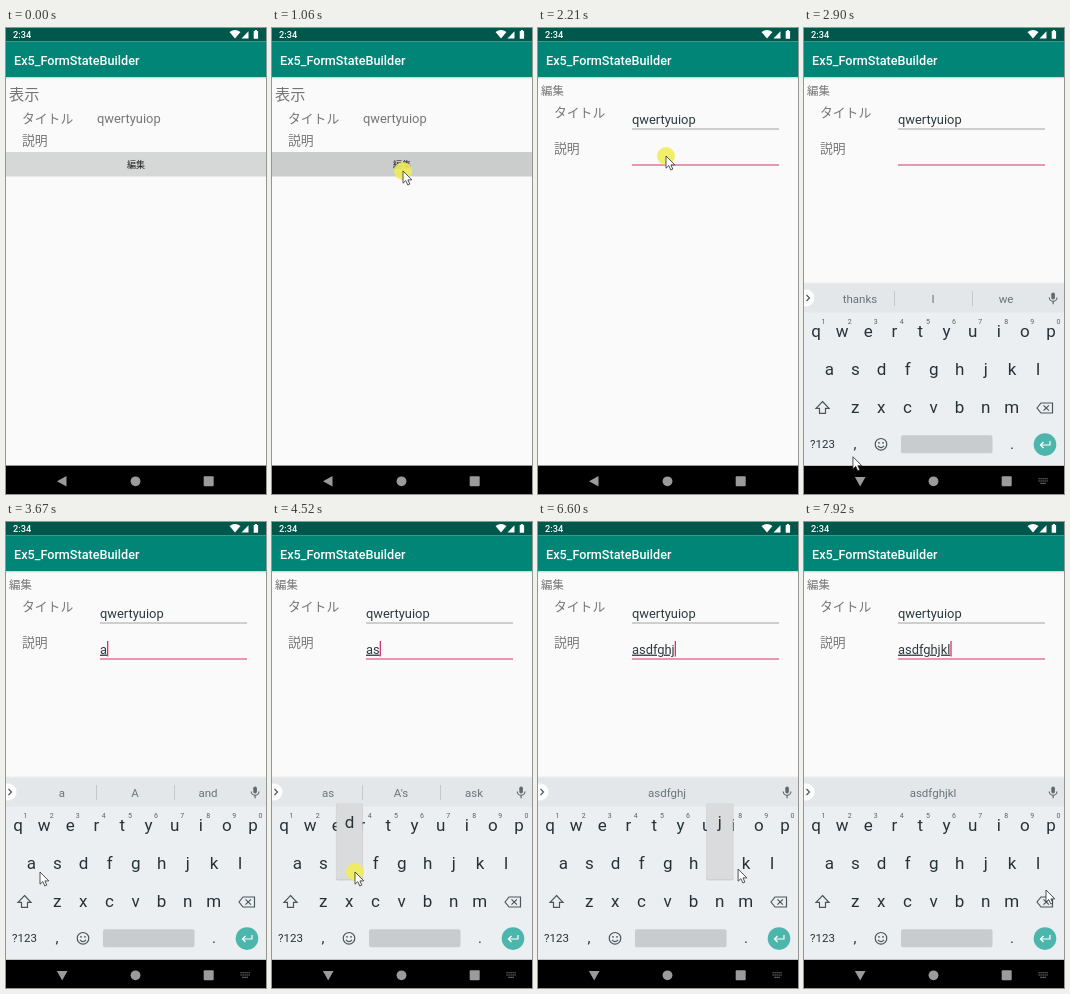
Animation of 260x466 px, one loop 8 s. Source, as an HTML page:

```html
<!DOCTYPE html>
<html lang="ja">
<head>
<meta charset="utf-8">
<title>Form demo</title>
<style>
  html, body { margin: 0; width: 100%; height: 100%; overflow: hidden; background: #000; }
  svg { display: block; }
  #stage { width: 100vw; height: 100vh; }
  text { font-family: Roboto, "Noto Sans CJK JP", "Noto Sans CJK", sans-serif; white-space: pre; }
  .medium { font-weight: 500; }
  #typed { text-decoration: underline; text-decoration-thickness: .8px; }
</style>
</head>
<body>
<svg id="stage" viewBox="0 0 260 466"></svg>
<script>
const LOOP = 8000;
const OPEN_AT = 1380, OPEN_MS = 425;
const FOCUS_AT = 2210, KEYBOARD_AT = 2440;
const STAGE_H = 466, BODY_H = 437.6;
const GRAY = '#757575', INK = '#263238', FIELD_INK = '#2c3a3d', PINK = '#d8346e', RULE = '#a3a3a3';

// Markup helpers
const text = (x, y, size, str, fill = GRAY, attrs = '') =>
  `<text x="${x}" y="${y}" font-size="${size}" fill="${fill}" ${attrs}>${str}</text>`;
const centered = (x, y, size, str, fill, attrs = '') =>
  text(x, y, size, str, fill, `text-anchor="middle" ${attrs}`);
const rect = (x, y, w, h, fill, attrs = '') =>
  `<rect x="${x}" y="${y}" width="${w}" height="${h}" fill="${fill}" ${attrs}/>`;
const line = (y, id = '') =>
  `<line id="${id}" x1="94" x2="241" y1="${y}" y2="${y}" stroke="${RULE}"/>`;

const appFrame = () =>
  rect(0, 0, 260, BODY_H, '#fafafa') + rect(0, 0, 260, 13.5, '#00574b') +
  rect(0, 13.5, 260, 35.5, '#008577') +
  rect(0, 49, 260, 1, '#000', 'opacity=".14"') + rect(0, 50, 260, 1, '#000', 'opacity=".05"') +
  text(8, 36.8, 12.65, 'Ex5_FormStateBuilder', '#fff', 'class="medium"');

const viewScreen = appFrame() +
  text(3, 71.5, 15.2, '表示') +
  text(16, 94.6, 12.8, 'タイトル') + text(91, 94.5, 12.9, 'qwertyuiop') +
  text(16, 117, 12.8, '説明') +
  rect(0, 124, 260, 24.5, '#d6d7d7') +
  rect(0, 124, 260, 24.5, '#000', 'id="ripple" opacity="0"') +
  centered(130, 139.6, 9, '編集', '#222', 'class="medium"') +
  rect(0, 0, 260, BODY_H, '#000', 'id="dim" opacity="0"');

const editScreen = appFrame() +
  text(3, 66.7, 11.4, '編集') +
  text(16, 88.6, 12.8, 'タイトル') + text(94, 95.6, 12.9, 'qwertyuiop', FIELD_INK) + line(101) +
  text(16, 124.8, 12.8, '説明') +
  text(94, 131.6, 12.9, '', FIELD_INK, 'id="typed"') +
  rect(94, 119, 1.3, 15.5, PINK, 'id="caret"') + line(137, 'focusLine');

// Keyboard
const keyX = {};
const keyRow = (letters, x0, baseline) => [...letters].map((c, i) => {
  keyX[c] = x0 + i * 26.1;
  return centered(keyX[c], baseline, 17, c, INK);
}).join('');
const digits = [...'1234567890'].map((d, i) =>
  centered(19.5 + i * 26.1, 296, 7, d, '#566166')).join('');
const stroke = (d, color = '#4b565b') =>
  `<path d="${d}" fill="none" stroke="${color}" stroke-width="1.2"/>`;

const keyboard =
  rect(0, 254.5, 260, 1.5, '#000', 'opacity=".06"') +
  rect(0, 256, 260, 182, '#eceff1') + rect(0, 256, 260, 28.5, '#e3e7ea') +
  '<circle cx="2" cy="270" r="8.5" fill="#fff"/>' + stroke('M2.5 267l3 3l-3 3') +
  '<g id="suggestions"></g>' +
  rect(247.3, 264.5, 3.6, 7, '#5f6a6f', 'rx="1.8"') +
  stroke('M245.3 269.5a3.8 3.8 0 0 0 7.6 0M249.1 273.3v3', '#5f6a6f') +
  keyRow('qwertyuiop', 12, 308.5) + digits +
  keyRow('asdfghjkl', 25.3, 347) + keyRow('zxcvbnm', 51.2, 385) +
  stroke('M18.5 373.5l6.5 6.8h-3.5v5h-6v-5h-3.5z') +
  stroke('M233 380l4-5h11.5v10H237zM239.5 377.3l5.4 5.4m0-5.4l-5.4 5.4') +
  centered(18.5, 420.3, 11.5, '?123', INK) + centered(51, 420.5, 15, ',', INK) +
  '<circle cx="77" cy="416.3" r="5.8" fill="none" stroke="#4b565b" stroke-width="1.2"/>' +
  '<circle cx="75" cy="414.8" r=".9" fill="#4b565b"/><circle cx="79" cy="414.8" r=".9" fill="#4b565b"/>' +
  stroke('M74 417.8q3 3.6 6 0') +
  rect(97, 407.3, 91.5, 18, '#c8cccf', 'rx="2"') + centered(208, 420.5, 15, '.', INK) +
  '<circle cx="241" cy="416.6" r="11.3" fill="#4db6ac"/>' +
  stroke('M246 413v4h-9.5m3-3l-3 3l3 3', '#fff') +
  `<g id="popup">${rect(-13.6, 281.5, 27.2, 77, '#000', 'rx="2" opacity=".13"')}
   ${rect(-13, 281, 26, 76, '#d9dbdc', 'rx="2"')}
   ${centered(0, 306, 17, '', INK, 'id="popupKey"')}</g>`;

const statusIcons = text(7, 10, 9.2, '2:34', '#fff', 'class="medium"') +
  `<path fill="#fff" d="M229 10.5L223.5 4Q229 0 234.5 4zM235.5 10.5L242.5 3.2V10.5z"/>` +
  rect(247.7, 3, 4.4, 7.8, '#fff', 'rx=".6"') + rect(248.9, 2, 2, 1.5, '#fff');

const NAV = '#9b9b9b';
const navIcons = `<path id="back" d="M51 453.3L60.5 448V458.6z" fill="${NAV}"/>
  <circle cx="129.5" cy="453.3" r="4.9" fill="${NAV}"/>` +
  rect(197.7, 448.3, 10, 10, NAV, 'rx="1"') +
  `<path id="imeIcon" d="M234.5 450.8h9.6M234.5 453h9.6M236.5 455.4h5.6" stroke="#8a8a8a"
   stroke-width="1.1" stroke-dasharray="1.2 .8"/>`;

document.getElementById('stage').innerHTML = `
  <clipPath id="revealClip"><rect id="reveal" width="260" height="${STAGE_H}"/></clipPath>
  <g id="view">${viewScreen}</g>
  <g id="edit"><g clip-path="url(#revealClip)">${editScreen}</g></g>
  <svg width="260" height="${BODY_H}"><g id="keyboard">${keyboard}</g></svg>
  ${statusIcons}${navIcons}
  <g id="pointer">
    <circle id="click" r="9" fill="#f0ec5c" opacity=".9"/>
    <path d="M0 0V12.2L2.8 9.6L4.8 14L6.8 13.1L4.9 8.9H8.8z" fill="#fff" stroke="#2a2a2a" stroke-width=".8"/>
  </g>`;

const el = {};
document.querySelectorAll('[id]').forEach(node => el[node.id] = node);
const set = (id, name, value) => el[id].setAttribute(name, value);
const show = (id, on) => set(id, 'visibility', on ? 'visible' : 'hidden');

// Timeline
const presses = [['a', 3430], ['s', 4050], ['d', 4520], ['f', 5070], ['g', 5600],
  ['h', 6060], ['j', 6440], ['k', 6910], ['l', 7600]];
const POPUP_MS = 235, COMMIT_MS = 80, CLICK_MS = 120;
const clicks = [980, 2130, 3290, ...presses.slice(1).map(p => p[1])];

const pointerPath = [ // time, x, y
  [210, 204, 468], [560, 168, 270], [900, 131, 143], [1600, 131, 143], [2050, 128, 128],
  [2400, 128, 128], [2900, 49, 429], [3210, 31, 353], [3440, 31, 350], [3670, 34, 350],
  [3890, 34, 350], [4050, 56, 350], [4130, 57, 350], [4290, 83, 350], [4650, 83, 350],
  [4820, 109, 349], [5130, 109, 349], [5220, 116, 347], [5450, 135, 348], [5690, 135, 348],
  [5840, 161, 348], [6190, 161, 348], [6400, 188, 348], [6500, 188, 348], [6600, 200, 347],
  [6760, 215, 347], [7140, 215, 347], [7370, 235, 346], [7540, 242, 345], [7770, 242, 345],
  [7920, 242, 368]];

const suggestionsFor = {
  '': ['thanks', 'I', 'we'], a: ['a', 'A', 'and'], as: ['as', "A's", 'ask'],
  asd: ['asd', 'ASD', 'and'], asdf: ['asdf', 'ASDF', 'and'],
  asdfg: ['asdfg', 'ASDFG', 'and'], asdfgh: ['asdfgh', 'ASDFGH', 'and']
};

const clamp = v => Math.min(1, Math.max(0, v));
const cubic = (a, b, c, d, s) =>
  a * (1 - s) ** 3 + 3 * b * s * (1 - s) ** 2 + 3 * c * s * s * (1 - s) + d * s ** 3;

// y at a given x on a Bezier curve, found by bisection
function curve(xs, ys, x) {
  let lo = 0, hi = 1;
  for (let i = 0; i < 24; i++) {
    const s = (lo + hi) / 2;
    if (cubic(...xs, s) < x) lo = s; else hi = s;
  }
  return cubic(...ys, lo);
}
const slideEase = p => curve([0, .4, .2, 1], [0, 0, 1, 1], p);
const revealEase = p => p < 1 / 6
  ? curve([0, .05, .1333, 1 / 6], [0, 0, .06, .4], p)
  : curve([1 / 6, .2083, .25, 1], [.4, .82, 1, 1], p);

function pointerAt(t) {
  const i = pointerPath.findIndex(p => p[0] > t);
  if (i === 0) return pointerPath[0].slice(1);
  if (i < 0) return pointerPath.at(-1).slice(1);
  const [t0, x0, y0] = pointerPath[i - 1], [t1, x1, y1] = pointerPath[i];
  const p = (t - t0) / (t1 - t0);
  return [x0 + (x1 - x0) * p, y0 + (y1 - y0) * p];
}

function drawScreens(t) {
  const p = clamp((t - OPEN_AT) / OPEN_MS), slide = slideEase(p);
  set('ripple', 'opacity', .1 * clamp((t - 980) / 160));
  set('view', 'transform', `translate(0 ${-8.9 * slide})`);
  set('dim', 'opacity', .1 * clamp(p * 4));
  show('view', p < 1);
  set('edit', 'transform', `translate(0 ${p < 1 ? 19.1 * (1 - slide) : 0})`);
  set('reveal', 'y', p < 1 ? .959 * STAGE_H * (1 - revealEase(p)) : 0);
  show('edit', p > 0);
}

let shownSuggestions;
function drawTyping(t) {
  const done = presses.filter(p => t >= p[1] + COMMIT_MS);
  const typed = done.map(p => p[0]).join('');
  el.typed.textContent = typed;

  const focused = t >= FOCUS_AT;
  set('focusLine', 'stroke', focused ? PINK : RULE);
  set('focusLine', 'stroke-width', focused ? 1.2 : 1);
  const lastEdit = done.length ? done.at(-1)[1] + COMMIT_MS : 2290;
  show('caret', t >= lastEdit && Math.floor((t - lastEdit) / 500) % 2 === 0);
  set('caret', 'x', 94 + (typed ? el.typed.getComputedTextLength() : 0));

  if (typed !== shownSuggestions) {
    shownSuggestions = typed;
    const words = suggestionsFor[typed];
    const word = (x, str) => centered(x, 274.8, 11.5, str, '#69757a');
    el.suggestions.innerHTML = words
      ? words.map((w, i) => word(56 + 73 * i, w)).join('') +
        rect(90, 263, 1, 15, '#c3c8cb') + rect(168, 263, 1, 15, '#c3c8cb')
      : word(129, typed);
  }

  const held = presses.find(p => t >= p[1] && t < p[1] + POPUP_MS);
  show('popup', !!held);
  if (held) {
    set('popup', 'transform', `translate(${keyX[held[0]]} 0)`);
    el.popupKey.textContent = held[0];
  }
}

function drawKeyboard(t) {
  const open = t >= KEYBOARD_AT;
  const p = clamp((t - KEYBOARD_AT + 60) / 260), ease = 1 - (1 - p) ** 2;
  set('keyboard', 'display', open ? 'inline' : 'none');
  set('keyboard', 'opacity', ease);
  set('keyboard', 'transform', `translate(0 ${20 * (1 - ease)})`);
  set('back', 'transform', open ? 'rotate(-90 56.2 453.3)' : '');
  show('imeIcon', open);
}

function draw() {
  const t = performance.now() % LOOP;
  drawScreens(t);
  drawTyping(t);
  drawKeyboard(t);
  set('pointer', 'transform', `translate(${pointerAt(t)})`);
  show('click', clicks.some(c => t >= c && t < c + CLICK_MS));
  requestAnimationFrame(draw);
}
draw();
</script>
</body>
</html>
```
